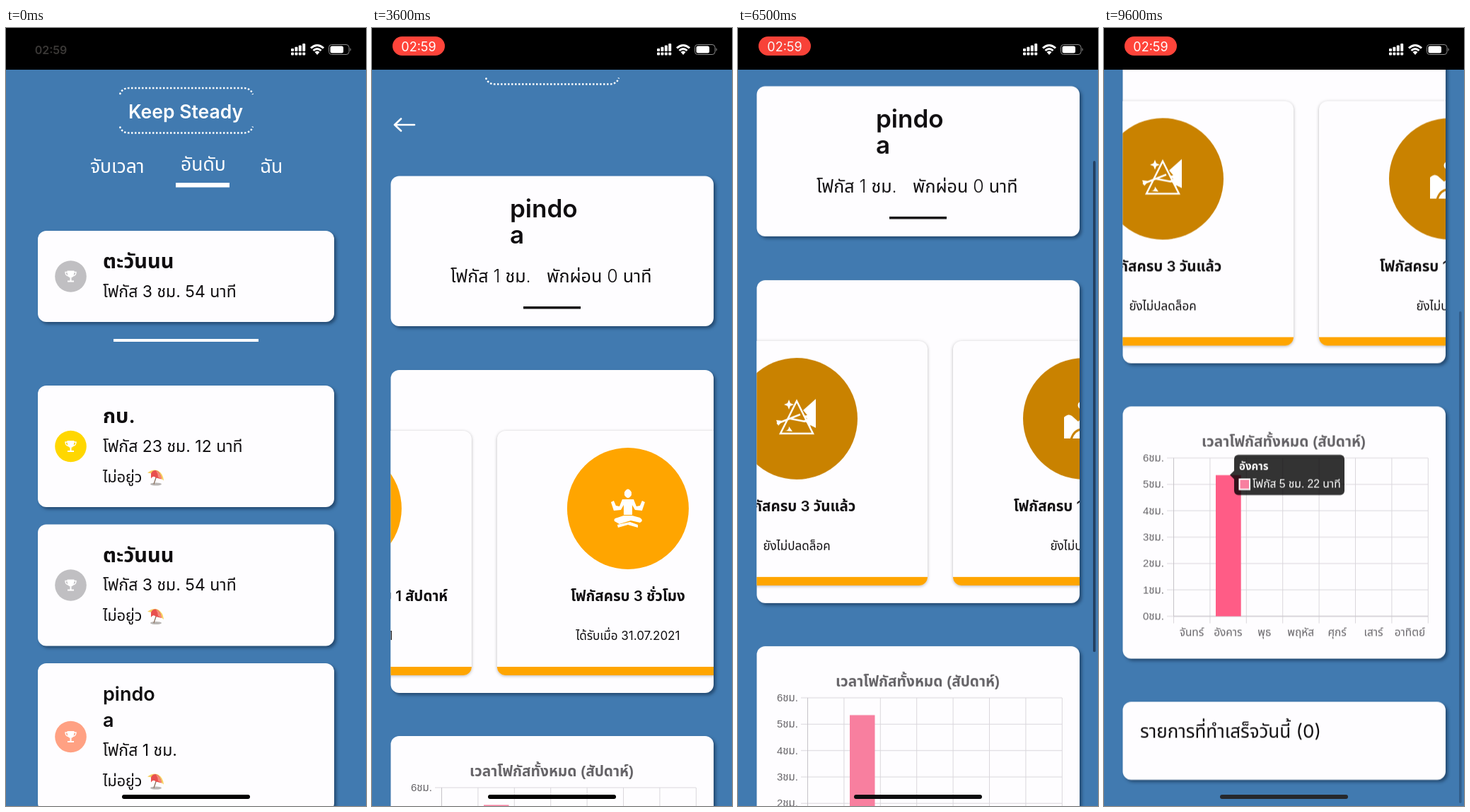
An HTML page for the animation above (9.7 s loop, 509 by 1101 pixels).

```html
<!DOCTYPE html>
<html lang="th">
<head>
<meta charset="utf-8">
<title>Focus ranking</title>
<style>
html, body { margin: 0; width: 100%; height: 100%; overflow: hidden; background: #fff; }
svg { display: block; width: 509px; height: 1101px; font-family: Inter, "Noto Sans Thai Looped", "Noto Sans Thai", "Noto Sans", sans-serif; }
.chart { font-family: "Liberation Sans", "Noto Sans Thai Looped", "Noto Sans Thai", "Noto Sans", sans-serif; }
.b { font-weight: 600; }
.l { font-weight: 300; }
.mid { text-anchor: middle; }
.end { text-anchor: end; }
.card { fill: #fefdff; filter: drop-shadow(3px 3px 2px rgba(5, 25, 50, .5)); }
.award { fill: #fefdff; filter: drop-shadow(0 1px 2px rgba(0, 0, 0, .28)); }

.scroll, .slide, .board, .skel, .full, .thumb, .pill, .rec, .time, .idle, .tip, .home {
  animation: 9.7s linear infinite;
}
.scroll { animation-name: scroll; }
.slide { animation-name: slide; }
.thumb { animation-name: thumb; }
.pill { animation-name: pill; }
.idle { animation-name: idle; }
.rec { animation-name: rec; }
.time { animation-name: time; }
.tip { animation-name: tip; }
.home { animation-name: home; }
.board { animation-name: board; animation-timing-function: step-end; }
.skel { animation-name: skel; animation-timing-function: step-end; }
.full { animation-name: full; animation-timing-function: step-end; }

@keyframes scroll {
  0%, 1.5% { transform: translateY(0); animation-timing-function: ease-out; }
  7.5%, 64.5% { transform: translateY(-69px); animation-timing-function: cubic-bezier(.3, .3, .4, 1); }
  73.2% { transform: translateY(-353px); animation-timing-function: ease-in-out; }
  81.44% { transform: translateY(-544px); animation-timing-function: ease-out; }
  84.5% { transform: translateY(-548px); animation-timing-function: ease-in-out; }
  92%, 100% { transform: translateY(-535.5px); }
}
@keyframes thumb {
  0%, 1.5% { transform: translateY(64px); height: 968px; opacity: 0; animation-timing-function: ease-out; }
  2.5% { opacity: 1; }
  7.5%, 12.36% { transform: translateY(126px); height: 968px; }
  12.37%, 20% { transform: translateY(109px); height: 729px; opacity: 1; }
  23%, 64.4% { transform: translateY(109px); height: 729px; opacity: 0; }
  64.5% { transform: translateY(109px); height: 695px; opacity: 0; animation-timing-function: cubic-bezier(.3, .3, .4, 1); }
  66% { opacity: 1; }
  73.2% { transform: translateY(286px); height: 695px; animation-timing-function: ease-in-out; }
  81.44% { transform: translateY(409px); height: 688px; animation-timing-function: ease-out; }
  84.5% { transform: translateY(412px); height: 685px; animation-timing-function: ease-in-out; }
  92% { transform: translateY(401px); height: 696px; }
  97% { opacity: 1; }
  100% { transform: translateY(401px); height: 696px; opacity: .2; }
}
@keyframes slide {
  0%, 32% { transform: translateX(0); animation-timing-function: ease-in-out; }
  37.1% { transform: translateX(-279px); animation-timing-function: ease-out; }
  42%, 46% { transform: translateX(-416px); animation-timing-function: ease-in-out; }
  53% { transform: translateX(-780px); animation-timing-function: ease-out; }
  57.7% { transform: translateX(-919px); animation-timing-function: ease-out; }
  62%, 100% { transform: translateX(-965px); }
}
@keyframes board { 0% { opacity: 1; } 12.37%, 100% { opacity: 0; } }
@keyframes skel { 0% { opacity: 0; } 12.37% { opacity: 1; } 22.7%, 100% { opacity: 0; } }
@keyframes full { 0% { opacity: 0; } 22.7%, 100% { opacity: 1; } }
@keyframes idle { 0%, 1% { opacity: 1; } 3%, 100% { opacity: 0; } }
@keyframes pill {
  0%, 1% { opacity: 0; }
  4%, 6% { opacity: 1; }
  11.3% { opacity: .84; }
  14.4% { opacity: .9; }
  16%, 25.8% { opacity: 1; }
  30% { opacity: .85; }
  35%, 46% { opacity: 1; }
  52% { opacity: .85; }
  55.7%, 66% { opacity: 1; }
  72% { opacity: .85; }
  73.2% { opacity: .87; }
  77%, 87% { opacity: 1; }
  92.5% { opacity: .85; }
  97%, 100% { opacity: 1; }
}
@keyframes rec { 0%, 25.5% { opacity: 1; } 28%, 100% { opacity: 0; } }
@keyframes time { 0%, 26.5% { opacity: 0; } 29%, 100% { opacity: 1; } }
@keyframes tip { 0%, 95% { opacity: 0; } 97.5%, 100% { opacity: 1; } }
@keyframes home { 0%, 65% { fill: #000; } 71%, 100% { fill: #26282c; } }
</style>
</head>
<body>
<svg id="stage" viewBox="0 0 509 1101">
  <defs>
    <g id="cup">
      <path d="M-5-8H5C5-1 3 2 0 2S-5-1-5-8ZM-1 1H1V6H-1ZM-4.500 6H4.500V8H-4.500Z" fill="#fff"/>
      <path d="M-4.500-6H-7.500Q-7.500-1-3-.5M4.500-6H7.500Q7.500-1 3-.5" fill="none" stroke="#fff" stroke-width="1.400"/>
    </g>
    <g id="shade">
      <ellipse cx="12" cy="21" rx="8" ry="2" fill="#b9b6b4"/>
      <path d="M13 9 9 21" stroke="#8b6f5c" stroke-width="1.300"/>
      <path d="M0 5Q8-1 15 2Q22 6 23 16Q12 6 0 5Z" fill="#f6cf62"/>
      <path d="M5 6Q7 1 12 1.500Q19 4 20 14L12 12Q8 8 5 13Z" fill="#e8504f"/>
      <path d="M12 2Q18 4 20 14L15 11Q15 6 12 2Z" fill="#f58a78"/>
    </g>
    <g id="sit" fill="#fff">
      <path d="M-5-23Q0-32 5-23V-19Q0-11-5-19Z"/>
      <path d="M-8-13H8L12-3 17-4 20-11 24-9 20 3 10 2 6-5V9H-6V-5L-10 2-20 3-24-9-20-11-17-4-12-3Z"/>
      <path d="M-6 10H6L17 13Q23 17 17 20L4 17-12 22-19 18Q-21 14-15 13ZM-15 23 3 19 14 23V27L0 23-14 27Z"/>
    </g>
    <g id="prism">
      <path d="M0-25 23 21H-23ZM-28 7 5-6M-9 0 12 4" fill="none" stroke="#fff" stroke-width="2.500"/>
      <path d="M9-12 27-28V13L19 9 20 14 15 6 9 3 15 0 9-4 15-5ZM-11-27-9-22-4-20-9-18-11-13-13-18-18-20-13-22ZM-29 2-20 3-26 10ZM-17 17Q-11 17-11 11L-6 18Z" fill="#fff"/>
    </g>
    <g id="hill">
      <path d="M-28 28V-2Q-22-8-17-4L-8 4Q0-4 8-8L28 6V28Z" fill="#fff"/>
      <path d="M-18 29Q-14 16-3 15T6 4" fill="none" stroke="#c98200" stroke-width="3"/>
      <circle cx="-3" cy="-19" r="5.500" fill="#fff"/>
    </g>
    <g id="week" fill="none" stroke="#fff" stroke-width="4">
      <rect x="-23" y="-20" width="46" height="42" rx="4"/>
      <path d="M-23-7H23M-11-26V-14M11-26V-14"/>
    </g>
  </defs>
</svg>
<script>
const fmt = (x, y, size, str, cls = '', fill = '#100e10') =>
  `<text x="${x}" y="${y}" font-size="${size}" class="${cls}" fill="${fill}">${str}</text>`;
const box = (x, y, w, h, r, fill, cls = '') =>
  `<rect x="${x}" y="${y}" width="${w}" height="${h}" rx="${r}" fill="${fill}" class="${cls}"/>`;
const card = (x, y, w, h) => box(x, y, w, h, 12, '#fefdff', 'card');
const line = (d, color, width, extra = '') =>
  `<path d="${d}" fill="none" stroke="${color}" stroke-width="${width}" ${extra}/>`;

// Ranking page
function rank(y, h, cy, color, names, focus, away) {
  let base = y + 53, out = card(45, y, 419, h);
  out += `<circle cx="91.500" cy="${cy}" r="22.300" fill="${color}"/><use href="#cup" x="91.500" y="${cy}"/>`;
  const size = names.length > 1 ? 27 : 29;
  names.forEach((n, i) => out += fmt(137, base + i * 37, size, n, 'b'));
  base += (names.length - 1) * 37 + 40.5;
  out += fmt(137, base, 23, focus);
  if (away) out += fmt(137, base + 43, 21.5, 'ไม่อยู่ว') + `<use href="#shade" x="200" y="${base + 25}"/>`;
  return out;
}

const silver = '#c0bfc2', sun = 'ตะวันนน', sunTime = 'โฟกัส 3 ชม. 54 นาที';
const board = fmt(254, 128, 26.5, 'Keep Steady', 'b mid', '#fff') +
  fmt(119, 205, 26.5, 'จับเวลา', 'l', '#fff') + fmt(247, 202, 26.5, 'อันดับ', 'l', '#fff') +
  fmt(359, 205, 26.5, 'ฉัน', 'l', '#fff') + box(240, 219, 76, 6.5, 0, '#fff') +
  rank(287, 129, 351.5, silver, [sun], sunTime) + box(152, 440, 205, 4, 0, '#fff') +
  rank(506, 172, 592, '#ffd700', ['กบ.'], 'โฟกัส 23 ชม. 12 นาที', true) +
  rank(702.5, 172, 788.5, silver, [sun], sunTime, true) +
  rank(899, 210, 1003, '#ffa183', ['pindo', 'a'], 'โฟกัส 1 ชม.', true);

// Profile page
const profile = line('M60 137H32M41 128.500 32 137 41 145.500', '#fff', 2.6, 'stroke-linecap="round" stroke-linejoin="round"') +
  card(26.5, 209.5, 456.5, 212.5) + fmt(195, 268, 35, 'pindo', 'b') + fmt(195, 305, 35, 'a', 'b') +
  fmt(111, 360, 25, 'โฟกัส 1 ชม.', 'l') + fmt(247, 360, 25, 'พักผ่อน 0 นาที', 'l') +
  box(214, 394, 81, 3.5, 0, '#100e10');

const orange = '#ffa500', locked = '#c98200', pale = '#fbe1b0';
const got = 'ได้รับเมื่อ 31.07.2021', notYet = 'ยังไม่ปลดล็อค';
const awards = [
  ['โฟกัสอย่างต่อเนื่องจนครบ 1 สัปดาห์', got, orange, 'week'],
  ['โฟกัสครบ 3 ชั่วโมง', got, orange, 'sit'],
  ['โฟกัสครบ 3 วันแล้ว', notYet, locked, 'prism'],
  ['โฟกัสครบ 1 สัปดาห์แล้ว', notYet, locked, 'hill']
];

function award(i, h, color, inner) {
  const x = 51 + i * 406, end = 570 + h;
  return box(x, 570, 370, h, 12, '#fefdff', 'award') +
    `<path d="M${x} ${end - 12}H${x + 370}A12 12 0 0 1 ${x + 358} ${end}H${x + 12}A12 12 0 0 1 ${x} ${end - 12}Z" fill="${orange}"/>` +
    `<circle cx="${x + 185}" cy="680" r="86" fill="${color}"/>` + inner(x + 185);
}

function rewards(id, h, items) {
  return card(26.5, 484, 456.5, h) +
    `<clipPath id="${id}"><rect x="26.500" y="484" width="456.500" height="${h}" rx="12"/></clipPath>` +
    `<g clip-path="url(#${id})"><g class="slide">${fmt(51, 534, 25, 'รางวัล', 'b')}${items}</g></g>`;
}

const ghosts = [0, 1].map(i => award(i, 348, pale, c =>
  box(c - 96, 786, 192, 24, 12, pale) + box(c - 48, 830, 96, 15, 7.5, pale))).join('');
const earned = awards.map(([name, note, color, icon], i) => award(i, 346, color, c =>
  `<use href="#${icon}" x="${c}" y="680"/>` + fmt(c, 811, 20.5, name, 'b mid') + fmt(c, 866, 17, note, 'mid'))).join('');

const days = ['จันทร์', 'อังคาร', 'พุธ', 'พฤหัส', 'ศุกร์', 'เสาร์', 'อาทิตย์'];
function chart(top, max) {
  const y0 = top + 73, y1 = top + 297, stepX = 51.4, stepY = 224 / max, grey = '#666468';
  let out = card(26.5, top, 456.5, 357) + fmt(254, top + 57, 20.8, 'เวลาโฟกัสทั้งหมด (สัปดาห์)', 'b mid', grey);
  let grid = '';
  for (let i = 0; i <= max; i++) {
    const y = y1 - i * stepY;
    grid += `M89 ${y}H458`;
    out += fmt(85, y + 5, 15, i + 'ชม.', 'end', grey);
  }
  for (let i = 0; i <= 7; i++) grid += `M${98.5 + i * stepX} ${y0}V${y1 + 10}`;
  out += line(grid, '#dad7dc', 1) + line(`M98.500 ${y0}V${y1}H458`, '#c6c3c8', 1);
  days.forEach((d, i) => out += fmt(124 + i * stepX, top + 325, 15.4, d, 'mid', grey));
  return `<g class="chart">${out}</g>`;
}

const tip = '<g class="tip chart">' + box(158, 1099.5, 35.5, 199.5, 0, '#ff5c86') +
  '<path d="M178 1099 184 1093V1105Z" fill="#000" fill-opacity=".8"/>' +
  `<g opacity=".8">${box(184, 1070.5, 156, 57, 6, '#000')}</g>` +
  fmt(191, 1091.5, 15, 'อังคาร', 'b', '#fff') +
  '<rect x="191.500" y="1105" width="14.500" height="14.500" fill="#f87f9f" stroke="#fff" stroke-width="2"/>' +
  fmt(210, 1116.5, 15.6, 'โฟกัส 5 ชม. 22 นาที', '', '#fff') + '</g>';

const skel = profile + rewards('clipA', 459, ghosts) + chart(1004, 1);
const full = profile + rewards('clipB', 457, earned) + chart(1002, 6) +
  box(158, 1099.5, 35.5, 199.5, 0, '#f87f9f') + tip +
  card(26.5, 1420, 456.5, 110.5) + fmt(51, 1471, 26, 'รายการที่ทำเสร็จวันนี้ (0)');

const header = line('M161 94Q164 85 174 85H336Q346 85 349 94M161 139.500Q164 148.500 174 148.500H336Q346 148.500 349 139.500',
  '#fff', 2.4, 'stroke-dasharray="2.5 2.5"');

// Status bar
let signal = '';
for (let i = 0; i < 4; i++) {
  const x = 403 + i * 5.4, h = 4 + i * 2.3;
  signal += box(x, 33 - h, 4, h, 1, '#fff') + box(x, 34.5, 4, 4, 1, '#fff');
}
const status = box(0, 0, 509, 59, 0, '#000') + signal +
  line('M431 28.500Q440 20.500 449 28.500M434.500 32Q440 27 445.500 32', '#fff', 3) +
  '<path d="M436.500 34Q440 31 443.500 34L440 38Z" fill="#fff"/>' +
  '<rect x="456.500" y="23.500" width="28.500" height="14" rx="4" fill="none" stroke="#8b8b8b"/>' +
  box(458.5, 25.5, 18.5, 10, 2.5, '#fff') + '<path d="M486.500 28Q489 30.500 486.500 33Z" fill="#8b8b8b"/>' +
  fmt(63.5, 36.5, 16, '02:59', 'idle b mid', '#3a3836') +
  '<g class="pill">' + box(29, 12, 74, 27, 13.5, '#ff443a') +
  '<g class="rec"><circle cx="66" cy="26" r="8.500" fill="none" stroke="#fff" stroke-width="2"/><circle cx="66" cy="26" r="4.500" fill="#fff"/></g>' +
  fmt(66, 32.5, 18, '02:59', 'time mid', '#fff') + '</g>';

document.getElementById('stage').insertAdjacentHTML('beforeend',
  box(0, 0, 509, 1101, 0, '#fff') +
  `<g class="scroll">${box(0, 0, 509, 1636, 0, '#417ab0')}${header}<g class="board">${board}</g>` +
  `<g transform="translate(0 69)"><g class="skel">${skel}</g><g class="full">${full}</g></g></g>` +
  box(502, 0, 3.6, 729, 1.8, 'rgba(15,25,45,.6)', 'thumb') +
  box(164, 1085, 181, 6, 3, '#000', 'home') + status);
</script>
</body>
</html>
```
